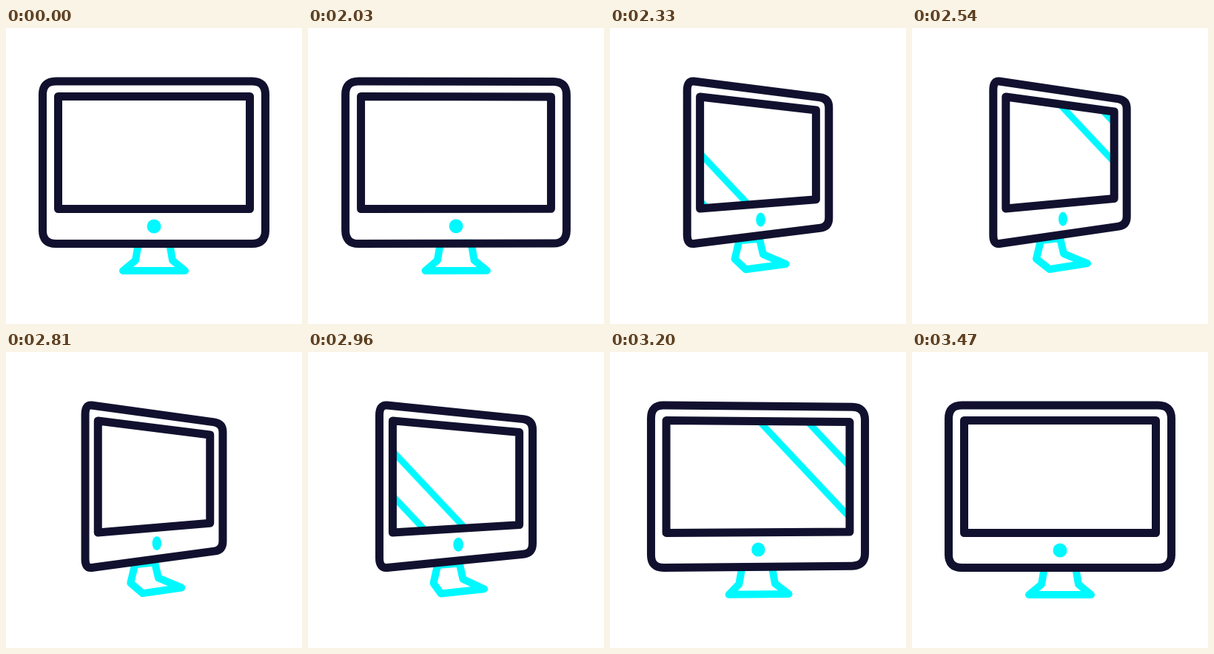
An HTML page without scripts that plays this animation: 400x400 px, repeating every 3.65 s.

```html
<!DOCTYPE html>
<html lang="en">
<head>
<meta charset="utf-8">
<title>Turning monitor</title>
<style>
  :root { --ink: #11112f; --glow: #00f8ff; --loop: 3650ms; }
  html, body { margin: 0; height: 100%; overflow: hidden; background: #fff; }
  svg { display: block; width: 100%; height: 100%; }

  path { fill: none; stroke-linecap: round; stroke-linejoin: round; }
  .ink { stroke: var(--ink); stroke-width: 11; }
  .glow { stroke: var(--glow); stroke-width: 10; }

  /* Each part morphs between a front view and a turned view. */
  .part { d: var(--front); animation: turn var(--loop) infinite; }
  .case {
    --front: path("M67.5 72 L332.5 72 Q350.5 72 350.5 90 L350.5 273.5 Q350.5 291.5 332.5 291.5 L67.5 291.5 Q49.5 291.5 49.5 273.5 L49.5 90 Q49.5 72 67.5 72 Z");
    --turned: path("M118 72 L279 96 Q290 98 290 109 L290 255 Q290 266.5 279 268 L118 291.5 Q110 292.5 110 280 L110 84 Q110 71 118 72 Z");
  }
  .screen {
    --front: path("M70.5 92.5 L329.5 92.5 L329.5 244.5 L70.5 244.5 Z");
    --turned: path("M127 93 L273 113 L273 230.5 L127 244 Z");
  }
  .stand {
    --front: path("M179 291 L175 314 L158 328 L242 328 L225 314 L221 291 Z");
    --turned: path("M174 287 L168 312 L186 326 L237 318 L205 305 L200 284 Z");
  }
  .button {
    --front: path("M190.5 268 a9.5 9.5 0 1 0 19 0 a9.5 9.5 0 1 0 -19 0 Z");
    --turned: path("M198 258 a6 9.5 0 1 0 12 0 a6 9.5 0 1 0 -12 0 Z");
    fill: var(--glow);
  }
  @keyframes turn {
    0% { d: var(--front); }
    54.79% { d: var(--front); animation-timing-function: cubic-bezier(.25, 0, 0, 1); }
    71.23% { d: var(--turned); animation-timing-function: cubic-bezier(.76, 0, .26, 1); }
    95.07%, 100% { d: var(--front); }
  }

  /* Two reflections cross the screen twice. */
  .shine { stroke: var(--glow); stroke-width: 9; animation: sweep var(--loop) linear infinite; }
  .lead { --a: -65px; --b: 388px; --c: -127px; --d: 467px; }
  .trail { --a: -132px; --b: 346px; --c: -175px; --d: 394px; }
  @keyframes sweep {
    0%, 60.26% { transform: translateX(-400px); }
    60.27% { transform: translateX(var(--a)); }
    73.97% { transform: translateX(var(--b)); }
    73.98% { transform: translateX(var(--c)); }
    94.52% { transform: translateX(var(--d)); }
    94.53%, 100% { transform: translateX(-400px); }
  }
</style>
</head>
<body>
<svg viewBox="0 0 400 400">
  <clipPath id="glass"><path class="part screen"/></clipPath>
  <path class="part stand glow"/>
  <g clip-path="url(#glass)">
    <path class="shine lead" d="M-47 47 L188 297"/>
    <path class="shine trail" d="M-47 47 L188 297"/>
  </g>
  <path class="part button"/>
  <path class="part screen ink"/>
  <path class="part case ink"/>
</svg>
</body>
</html>
```
